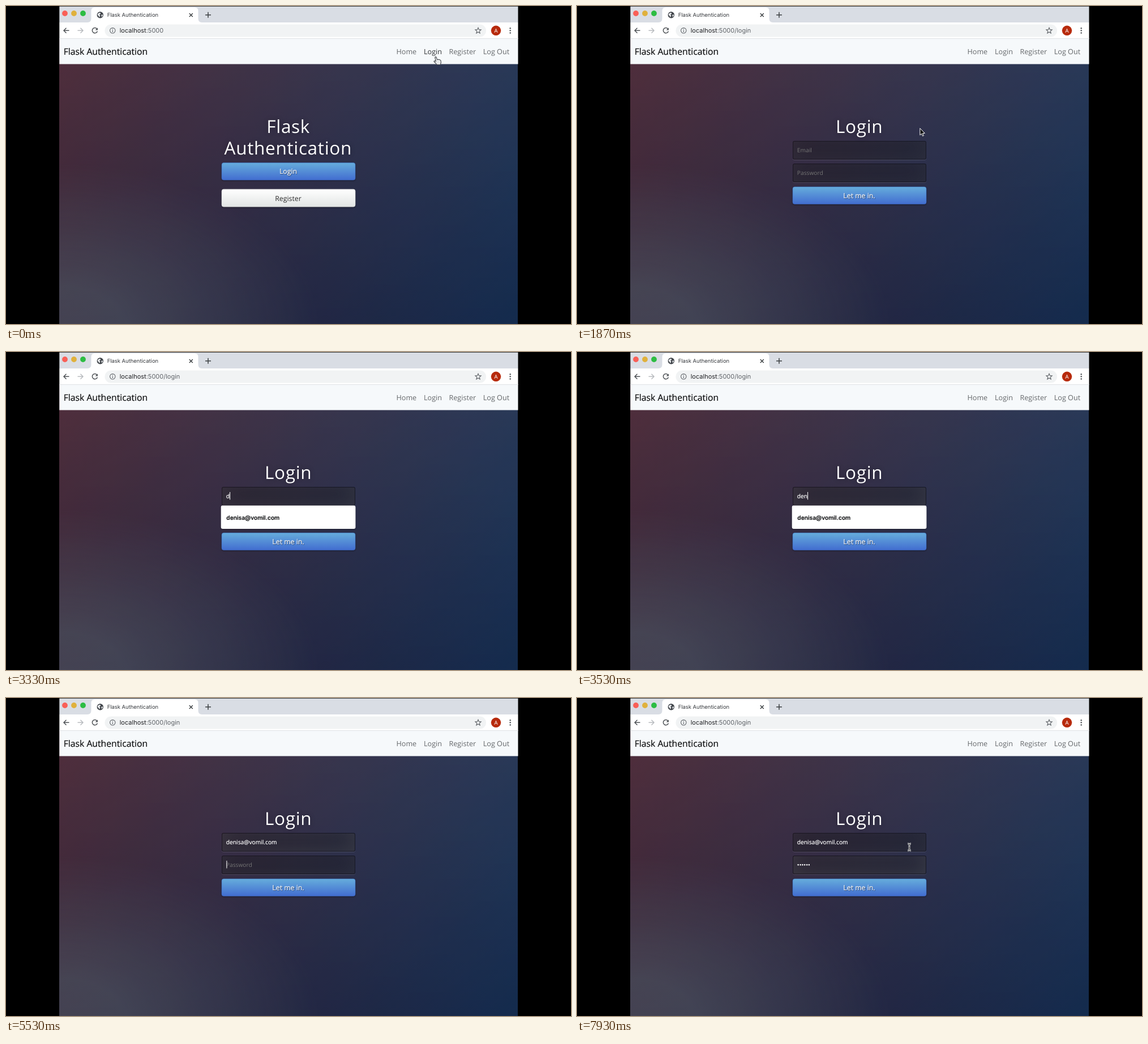
Animation, 998 px wide and 561 px high, one loop 8000 ms. Source, as an HTML page:

```html
<!DOCTYPE html>
<html lang="en">
<head>
<meta charset="utf-8">
<title>Flask Authentication</title>
<style>
html, body { margin: 0; width: 100%; height: 100%; overflow: hidden; background: #000; }
#stage { position: relative; width: 998px; height: 561px; overflow: hidden; background: #000; }
#page {
  position: absolute; left: 94.3px; top: 58px; width: 810.2px; height: 508px;
  background:
    linear-gradient(rgba(0,0,0,.11), rgba(0,0,0,.11)),
    radial-gradient(ellipse farthest-corner at 0% 100%, rgba(104,128,138,.4) 10%, rgba(138,114,76,0) 40%),
    linear-gradient(to bottom, rgba(57,173,219,.25) 0%, rgba(42,60,87,.4) 100%),
    linear-gradient(135deg, #670d10 0%, #092756 100%);
}
.field {
  position: absolute; left: 381px; width: 236px; height: 32.5px; box-sizing: border-box;
  background: rgba(0,0,0,.3); border: 1px solid rgba(0,0,0,.3); border-radius: 3.2px;
}
svg { position: absolute; left: 0; top: 0; }
text { white-space: pre; text-rendering: geometricPrecision; stroke-width: .2px; }
.ui { font-family: Inter, sans-serif; }
.web { font-family: "Open Sans", sans-serif; }
.h1 { font-size: 31.5px; letter-spacing: .7px; fill: #fff; text-anchor: middle; text-shadow: 0 0 8px rgba(0,0,0,.3); }
.brand { font-size: 15.74px; fill: #0c0d0e; stroke: #0c0d0e; }
.nav { font-size: 12.6px; fill: #65686b; }
.btn { font-size: 12.3px; text-anchor: middle; }
.pri { fill: #fff; stroke: #fff; text-shadow: .8px .8px .8px rgba(0,0,0,.4); }
.inp { font-size: 10.23px; fill: #fff; stroke: #fff; }
.hint { font-size: 10.23px; fill: #757575; }
.item { font-size: 10.2px; font-weight: 600; fill: #1a1b1d; stroke: #1a1b1d; }
.box { filter: drop-shadow(0 1px 1px rgba(0,0,0,.4)); }
</style>
</head>
<body>
<div id="stage">
  <div id="page"></div>
  <div id="fields">
    <div class="field" id="mailBox" style="top:238px"></div>
    <div class="field" id="passBox" style="top:278px"></div>
  </div>
  <svg width="998" height="561" viewBox="0 0 998 561">
    <defs>
      <linearGradient id="blue" x2="0" y2="1"><stop stop-color="#66addc"/><stop offset="1" stop-color="#426dd0"/></linearGradient>
      <linearGradient id="white" x2="0" y2="1"><stop stop-color="#fff"/><stop offset="1" stop-color="#e2e5e4"/></linearGradient>
      <clipPath id="view"><rect x="94.300" y=".8" width="810.200" height="561"/></clipPath>
    </defs>
    <g clip-path="url(#view)">
      <!-- browser window -->
      <path fill="#d9dde4" d="M94 0H905V29H94Z"/>
      <path fill="#fff" d="M144 29Q150.500 29 150.500 22V8.500Q150.500 2.500 156.500 2.500H333.500Q339.500 2.500 339.500 8.500V22Q339.500 29 346 29Z"/>
      <path fill="#fff" d="M94 29H905V58H94Z"/>
      <circle cx="104" cy="13" r="4.900" fill="#f95f57"/>
      <circle cx="120" cy="13" r="4.900" fill="#e0b13c"/>
      <circle cx="136" cy="13" r="4.900" fill="#2dbd43"/>
      <circle cx="166.300" cy="15.800" r="5.700" fill="#3f4348"/>
      <path fill="#e8eaed" d="M162 13.500L166 11.500L167.500 13.500L165 15L166.500 16.500L165 20L163.500 17.500L161.800 16ZM168.500 15.500L171 15L170.500 18L168.500 19Z"/>
      <text class="ui" x="178.700" y="19.200" font-size="9.44" fill="#34373b">Flask Authentication</text>
      <g fill="none" stroke="#3c4043" stroke-width="1.500">
        <path d="M323.800 13L329.800 19M329.800 13L323.800 19M357 10.800V20.800M352 15.800H362"/>
        <path stroke="#505458" d="M111.500 43.300H102M106.500 38.800L102 43.300L106.500 47.800"/>
        <path stroke="#b9bcc0" d="M126.500 43.300H136M131.500 38.800L136 43.300L131.500 47.800"/>
        <path stroke="#505458" d="M160.500 40.200A4.600 4.600 0 1 0 161.400 44.500"/>
      </g>
      <path fill="#505458" d="M162 38.200V42.600H157.600Z"/>
      <rect x="174.500" y="32.500" width="673.500" height="22" rx="11" fill="#f1f3f4"/>
      <g fill="none" stroke="#5f6368">
        <circle cx="188.300" cy="43.300" r="4.700" stroke-width="1.100"/>
        <path stroke-width="1.200" d="M188.300 42.700V46M188.300 40.500V41.700"/>
        <path id="star" stroke-width="1.100"/>
      </g>
      <text class="ui" x="200.700" y="47.300" font-size="11" fill="#202124">localhost<tspan fill="#5f6368" id="url"></tspan></text>
      <circle cx="865.500" cy="43.300" r="8.700" fill="#b72a0c"/>
      <text class="ui" x="865.500" y="46.700" font-size="9.4" fill="#fff" text-anchor="middle">A</text>
      <g fill="#505458"><circle cx="890.700" cy="39.200" r="1.250"/><circle cx="890.700" cy="43.300" r="1.250"/><circle cx="890.700" cy="47.400" r="1.250"/></g>

      <!-- site header -->
      <path fill="#f6f9fb" d="M94 57.500H905V102.600H94Z"/>
      <path fill="#dfe2e5" d="M94 57H905V58H94Z"/>
      <g class="web">
        <text class="brand" x="101.700" y="85.700">Flask Authentication</text>
        <text class="nav" x="689.500" y="85">Home</text>
        <text class="nav" x="738" y="85" id="navLogin">Login</text>
        <text class="nav" x="782.500" y="85">Register</text>
        <text class="nav" x="842.800" y="85">Log Out</text>
      </g>

      <g id="home" class="web">
        <text class="h1" x="498.700" y="224.100">Flask</text>
        <text class="h1" x="498.300" y="262">Authentication</text>
        <g class="box">
          <rect x="381" y="276.600" width="236" height="30.400" rx="3.500" fill="url(#blue)" stroke="#3f6cc4" stroke-width=".6"/>
          <rect x="381" y="323.200" width="236" height="31" rx="3.500" fill="url(#white)" stroke="#d9dadb" stroke-width=".6"/>
        </g>
        <text class="btn pri" x="498.500" y="296.300">Login</text>
        <text class="btn" x="498.500" y="343.500" fill="#2b2b2b">Register</text>
      </g>

      <g id="login" class="web">
        <text class="h1" x="498.700" y="224.100">Login</text>
        <text class="hint" id="mailHint" x="388.800" y="257.700">Email</text>
        <text class="inp" id="mail" x="388.800" y="257.700"></text>
        <text class="hint" id="passHint" x="388.800" y="297.700">Password</text>
        <text class="inp" id="pass" x="388.800" y="297.700"></text>
        <rect id="caret" width="1" height="13.500" fill="#fff"/>
        <rect class="box" x="381" y="319" width="236" height="30.400" rx="3.500" fill="url(#blue)" stroke="#3f6cc4" stroke-width=".6"/>
        <text class="btn pri" x="498.500" y="339">Let me in.</text>
      </g>

      <g id="drop" class="ui">
        <rect class="box" id="dropBox" x="379.700" y="270.800" width="237.700" rx="3.200" fill="#fff"/>
        <g id="items"></g>
      </g>

      <g id="status">
        <path fill="#dcdfe4" stroke="#b9bdc4" stroke-width=".6" d="M94 548.700H186.500Q190 548.700 190 552V562H94Z"/>
        <text class="ui" x="92.800" y="560" font-size="9.44" fill="#4c5055">localhost:5000/login</text>
      </g>

      <g id="cursor" stroke-linejoin="round">
        <path id="hand" fill="#e9ebed" stroke="#43464a" stroke-width="1.100"
          d="M-1.300 1.200Q0 -.8 1.200 1L2.600 5.200L5 4.700L7.300 5.300L9 6.700L9.400 10.500L8.200 13.700L2.200 14L-.5 11L-3 8.500Q-3 7 -1.200 7.300L.2 8.200Z"/>
        <path id="arrow" fill="#111" stroke="#fff" stroke-width="1"
          d="M0 0V12L2.800 9.500L4.600 13.700L6.500 12.900L4.700 8.800H8.500Z"/>
        <g id="beam" fill="none"></g>
      </g>
    </g>
  </svg>
</div>
<script>
const LOOP = 8000;
const STEP = 200 / 3;
const MAIL = 'denisa@vomil.com';
const SAVED = ['rcvrcv@vnivn.com', 'rcvrcv', 'owner@vomil.com', MAIL, 'ctbctb', 'rcv'];
// [time, characters typed]
const MAIL_KEYS = [[3270, 1], [3400, 2], [3530, 3], [4070, 7], [4330, 8], [4470, 9], [4600, 10],
  [4730, 11], [4800, 12], [5000, 13], [5130, 14], [5270, 15], [5330, 16]];
const PASS_KEYS = [[6470, 1], [6530, 2], [6600, 3], [6800, 4], [7130, 5], [7330, 6]];

const SVG = 'http://www.w3.org/2000/svg';
const el = Object.fromEntries([...document.querySelectorAll('[id]')].map(e => [e.id, e]));
const clamp = v => Math.min(1, Math.max(0, v));
const ramp = (t, a, b) => clamp((t - a) / (b - a));
const ease = u => u * u * (3 - 2 * u);
const mix = (a, b, u) => a + (b - a) * u;
const show = (e, on) => { e.style.display = on ? '' : 'none'; };
const typed = (keys, t) => keys.reduce((n, [at, count]) => t >= at ? count : n, 0);

function make(name, attrs) {
  const e = document.createElementNS(SVG, name);
  for (const k in attrs) e.setAttribute(k, attrs[k]);
  return e;
}

function setText(e, s) {
  if (e.textContent !== s) e.textContent = s;
}

el.star.setAttribute('d', 'M' + Array.from({ length: 10 }, (_, i) => {
  const r = i % 2 ? 2.4 : 5.4, a = i * Math.PI / 5;
  return (834 + r * Math.sin(a)).toFixed(2) + ' ' + (43.6 - r * Math.cos(a)).toFixed(2);
}).join('L') + 'Z');

const BEAM = 'M-3 -6.2Q0 -6.2 0 -4V4Q0 6.2 -3 6.2M3 -6.2Q0 -6.2 0 -4M3 6.2Q0 6.2 0 4M-1.5 1.5H1.5';
el.beam.append(
  make('path', { d: BEAM, stroke: '#e4e5e8', 'stroke-width': 2.8 }),
  make('path', { d: BEAM, stroke: '#222', 'stroke-width': 0.8 }));

function glow(e, focus) {
  e.style.boxShadow = `inset 0 -4px 35px rgba(100,100,100,${mix(.2, .4, focus)}), 0 .8px .8px rgba(255,255,255,.2)`;
}

let listed = '';
function drawList(list) {
  show(el.drop, list.length);
  const key = list.join();
  if (key === listed) return;
  listed = key;
  el.dropBox.setAttribute('height', 12.8 + 28.4 * list.length);
  el.items.replaceChildren(...list.map((s, i) => {
    const row = make('text', { class: 'item', x: 389.3, y: 295.6 + 28.4 * i });
    row.textContent = s;
    return row;
  }));
}

function drawCursor(t) {
  const hidden = t >= 3270 && t < 7870;
  show(el.cursor, !hidden);
  if (hidden) return;
  const nudge = ease(ramp(t, 0, 200)), trip = ease(ramp(t, 1260, 2130)), back = ramp(t, 7870, 7930);
  let x = mix(mix(759, 755.5, nudge), 565, trip);
  let y = mix(mix(89.5, 86.5, nudge), 251, trip);
  if (t >= 7870) {
    x = mix(585.5, 587, back);
    y = mix(262, 263, back);
  }
  const kind = y < 95 ? 'hand' : x < 617 && y > 238 && y < 270 ? 'beam' : 'arrow';
  for (const k of ['hand', 'arrow', 'beam']) show(el[k], k === kind);
  el.cursor.setAttribute('transform', `translate(${x.toFixed(2)} ${y.toFixed(2)})`);
}

function render(t) {
  const onLogin = t >= 930;
  show(el.home, !onLogin);
  show(el.login, onLogin);
  show(el.fields, onLogin);
  setText(el.url, onLogin ? ':5000/login' : ':5000');
  el.navLogin.style.fill = onLogin ? '' : '#2f3235';
  el.status.style.opacity = ramp(t, 330, 470) * (1 - ramp(t, 1470, 1670));

  const n = typed(MAIL_KEYS, t), dots = typed(PASS_KEYS, t);
  setText(el.mail, MAIL.slice(0, n));
  setText(el.pass, '•'.repeat(dots));
  show(el.mailHint, !n);
  show(el.passHint, !dots);

  const onMail = (ease(ramp(t, 2270, 2800)) + ease(ramp(t, 3200, 3800))) / 2;
  const onPass = ease(ramp(t, 5440, 6000));
  glow(el.mailBox, onMail * (1 - onPass));
  glow(el.passBox, onPass);

  const inPass = t >= 5470;
  show(el.caret, t >= 2270 && t < 7870);
  if (onLogin) {
    const run = inPass ? el.pass : el.mail;
    const width = run.textContent ? run.getComputedTextLength() : 0.6;
    el.caret.setAttribute('x', (388.8 + width).toFixed(2));
    el.caret.setAttribute('y', inPass ? 287 : 247);
  }

  const open = t >= 2270 && n < MAIL.length;
  drawList(!open ? [] : n ? [MAIL] : SAVED);
  drawCursor(t);
}

// Hold each picture for one step; times are kept to 10 ms.
const hold = t => Math.round(Math.floor((t + 5) / STEP) * STEP / 10) * 10 % LOOP;

const start = performance.now();
function tick() {
  render(hold((performance.now() - start) % LOOP));
  requestAnimationFrame(tick);
}
render(0);
requestAnimationFrame(tick);
</script>
</body>
</html>
```
